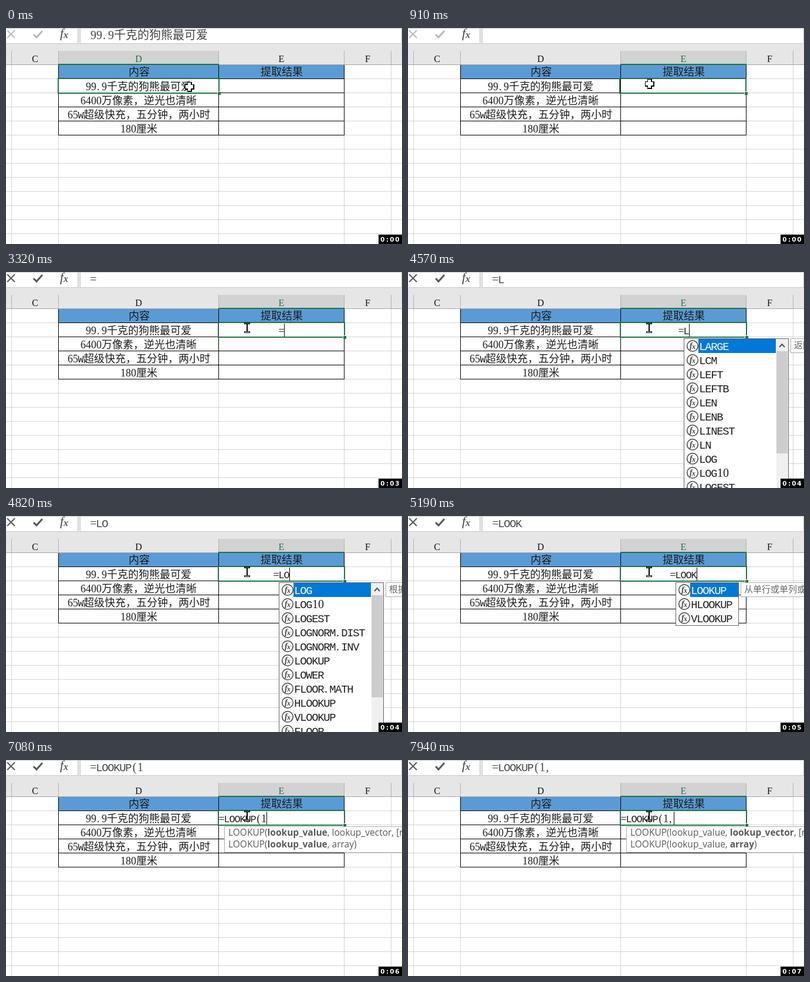
An HTML page with a canvas for the animation above (8 s loop, 675 by 368 pixels).

```html
<!DOCTYPE html>
<html lang="zh-CN">
<head>
<meta charset="utf-8">
<title>LOOKUP</title>
<style>
html, body { margin: 0; width: 100%; height: 100%; overflow: hidden; background: #fff; }
canvas { display: block; width: 675px; height: 368px; }
</style>
</head>
<body>
<canvas id="stage" width="675" height="368" lang="zh-CN"></canvas>
<script>
const ctx = document.getElementById('stage').getContext('2d');
const W = 675, H = 368, LOOP = 8000;
const GREEN = '#217346', GRID = '#d4d4d4', BAR = '#e6e6e6', INK = '#1c1c1c';
const CJK = '"Noto Sans CJK SC", "Noto Sans CJK JP", sans-serif';
const MONO = '"Liberation Mono", monospace';
const SERIF = '"Liberation Serif", serif';
const SANS = '"Open Sans", "Noto Sans", ' + CJK;

const COLS = [9, 89, 362, 576, 656];
const ROWS = ['99.9千克的狗熊最可爱', '6400万像素\uff0c逆光也清晰',
  '65W超级快充\uff0c五分钟\uff0c两小时', '180厘米'];

// Timelines: [start, value]
const TYPED = [[0, ''], [2000, '='], [3570, '=L'], [4820, '=LO'], [4940, '=LOO'], [5190, '=LOOK'],
  [5580, '=LOOKUP('], [7080, '=LOOKUP(1'], [7820, '=LOOKUP(1,']];
const CARET = [[0, 0], [2000, 1], [2590, .5], [2730, 0], [3100, .5], [3210, 1], [3940, .5], [4060, 0],
  [4450, .5], [4570, 1], [5960, .5], [6080, 0], [6570, .5], [6690, 1], [7450, .5], [7570, 0], [7820, 1]];
const CLOCK = [[0, 0], [1130, 1], [2110, 2], [3210, 3], [4190, 4], [5060, 5], [6180, 6], [7200, 7]];
const POINTER = [[0, [312, 100]], [550, [352, 98]], [660, [396, 96]], [780, [411, 95]]];
const SLIDE = [[0, 0], [780, .55], [910, .996], [1010, 1]];

const LISTS = {
  '=L': { names: 'LARGE LCM LEFT LEFTB LEN LENB LINEST LN LOG LOG10 LOGEST LOGNORM.DIST', tip: '返回数据集中第 k 个最大值' },
  '=LO': { names: 'LOG LOG10 LOGEST LOGNORM.DIST LOGNORM.INV LOOKUP LOWER FLOOR.MATH HLOOKUP VLOOKUP FLOOR LOGINV', tip: '根据给定底数返回数字的对数' },
  '=LOO': { names: 'LOOKUP FLOOR.MATH FLOOR.PRECISE HLOOKUP VLOOKUP FLOOR', tip: '从单行或单列或数组中查找一个值' },
  '=LOOK': { names: 'LOOKUP HLOOKUP VLOOKUP', tip: '从单行或单列或数组中查找一个值' }
};

function at(line, t) {
  let value = line[0][1];
  for (const [start, v] of line) if (t >= start) value = v;
  return value;
}

function box(x, y, w, h, color) {
  ctx.fillStyle = color;
  ctx.fillRect(x, y, w, h);
}

function panel(x, y, w, h, edge) {
  box(x, y, w, h, edge);
  box(x + 1, y + 1, w - 2, h - 2, '#fff');
}

function path(points, color, width) {
  ctx.beginPath();
  points.forEach(([x, y]) => ctx.lineTo(x, y));
  ctx.strokeStyle = color;
  ctx.lineWidth = width;
  ctx.stroke();
}

function label(str, x, y, font, color, align = 'left') {
  ctx.font = font;
  ctx.fillStyle = color;
  ctx.textAlign = align;
  ctx.fillText(str, x, y);
  return ctx.measureText(str).width;
}

const isWide = ch => ch > '\u2fff';
const cellWidth = (str, size) => [...str].reduce((w, ch) => w + (isWide(ch) ? size : size / 2), 0);

function glyphFont(ch, size) {
  if (isWide(ch)) return `300 ${size}px ${CJK}`;
  return /[A-Z]/.test(ch) ? `${size * .94}px ${MONO}` : `${size}px ${SERIF}`;
}

// Half-width and full-width characters on a fixed grid
function gridText(str, x, y, size, color) {
  for (const ch of str) {
    const w = isWide(ch) ? size : size / 2;
    if (/[.,]/.test(ch)) label(ch, x + 1, y, glyphFont(ch, size), color);
    else label(ch, x + w / 2, y, glyphFont(ch, size), color, 'center');
    x += w;
  }
}

function centered(str, cx, cy) {
  gridText(str, Math.round(cx - cellWidth(str, 18) / 2), cy + 6, 18, INK);
}

function formulaBar(text, editing) {
  box(0, 0, W, 62, BAR);
  box(0, 0, 122, 26, '#fff');
  box(127, 0, W - 128, 26, '#fff');
  box(0, 0, W, 1, '#c6c6c6');
  box(0, 26, 123, 1, '#c6c6c6');
  box(126, 26, W - 126, 1, '#c6c6c6');
  box(122, 0, 1, 27, '#c6c6c6');
  box(126, 0, 1, 27, '#c6c6c6');
  box(674, 0, 1, 27, '#c6c6c6');
  const ink = editing ? '#555' : '#b8b8b8';
  path([[2, 4], [15, 17]], ink, 2);
  path([[15, 4], [2, 17]], ink, 2);
  path([[47, 11], [52, 16], [62, 5]], ink, 3);
  label('f', 92, 16, `italic 22px ${SERIF}`, '#444');
  label('x', 98, 17, `italic bold 16px ${SERIF}`, '#555');
  gridText(text, 144, 19, 20, '#444');
}

function sheet(active) {
  box(0, 62, W, H - 62, '#fff');
  for (let y = 86; y < H; y += 24) box(0, y, W, 1, GRID);
  COLS.forEach(x => box(x, 62, 1, H - 62, GRID));

  box(COLS[active], 39, COLS[active + 1] - COLS[active], 23, '#d2d2d2');
  COLS.forEach(x => box(x, 39, 1, 23, '#b1b1b1'));
  box(0, 62, W, 1, '#a6a6a6');
  box(COLS[active], 61, COLS[active + 1] - COLS[active] + 1, 2, GREEN);
  [...'CDEF'].forEach((ch, i) => {
    const cx = (COLS[i] + COLS[i + 1] + 1) / 2;
    label(ch, cx, 58, `16px ${SERIF}`, i === active ? GREEN : '#111', 'center');
  });

  box(90, 63, 486, 23, '#5b9bd5');
  for (let y = 86; y <= 182; y += 24) box(89, y, 488, 1, '#000');
  [89, 362, 576].forEach(x => box(x, 63, 1, 120, '#000'));
  centered('内容', 226.5, 75);
  centered('提取结果', 470, 75);
  ROWS.forEach((row, i) => centered(row, 226, 100 + 24 * i));
}

function selection(k) {
  const left = Math.round(89 + 273 * k), right = Math.round(363 + 214 * k);
  ctx.strokeStyle = GREEN;
  ctx.lineWidth = 2;
  ctx.strokeRect(left, 86, right - left, 25);
  box(right - 3, 108, 6, 6, '#fff');
  box(right - 2, 109, 5, 5, GREEN);
}

function cellEdit(text, caret) {
  const w = cellWidth(text, 18);
  const x = text.length > 5 ? 363 : Math.round(469.5 - w / 2);
  gridText(text, x, 106, 18, INK);
  ctx.globalAlpha = caret;
  box(Math.round(x + w), 88, 1, 22, '#000');
  ctx.globalAlpha = 1;
  return x;
}

function fxIcon(x, y) {
  ctx.beginPath();
  ctx.arc(x, y, 9.3, 0, Math.PI * 2);
  ctx.fillStyle = '#fff';
  ctx.fill();
  ctx.strokeStyle = '#444';
  ctx.lineWidth = 1.5;
  ctx.stroke();
  label('f', x - 5, y + 4, `italic bold 14px ${SERIF}`, '#444');
  label('x', x - 1, y + 5, `italic bold 12px ${SERIF}`, '#444');
}

function suggestions({ names, tip }, x) {
  const items = names.split(' ');
  const long = items.length > 10;
  const inner = Math.max(...items.map(s => s.length)) * 10 + 12;
  const w = 26 + inner + (long ? 21 : 0);
  panel(x, 113, w, items.length * 24 + 2, '#646464');
  box(x + 25, 114, inner, 24, '#0078d7');
  items.forEach((name, i) => {
    const y = 126 + 24 * i;
    fxIcon(x + 15, y);
    gridText(name, x + 27, y + 7, 20, i ? INK : '#fff');
  });
  if (long) {
    const sx = x + w - 21;
    box(sx, 114, 20, H - 114, '#f0f0f0');
    box(sx, 135, 19, 174, '#cdcdcd');
    path([[sx + 5, 128], [sx + 9.5, 123], [sx + 14, 128]], '#505050', 2);
  }
  panel(x + w + 3, 113, W, 25, '#ababab');
  label(tip, x + w + 9, 130, `300 15px ${CJK}`, '#666');
}

function hintLine(parts, bold, y) {
  let x = 379;
  parts.forEach((part, i) => {
    x += label(part, x, y, `${i === bold ? 'bold ' : ''}15.5px ${SANS}`, '#595959');
  });
}

function hint(arg) {
  panel(372, 113, W, 45, '#ababab');
  const bold = arg * 2 + 1;
  hintLine(['LOOKUP(', 'lookup_value', ', ', 'lookup_vector', ', [result_vector])'], bold, 129);
  hintLine(['LOOKUP(', 'lookup_value', ', ', 'array', ')'], bold, 149);
}

function crossPointer(x, y) {
  box(x - 3, y - 8, 8, 17, '#000');
  box(x - 7, y - 4, 16, 9, '#000');
  box(x - 2, y - 7, 5, 14, '#fff');
  box(x - 6, y - 3, 13, 6, '#fff');
}

function beamPointer(x, y) {
  box(x - 1, y - 7, 2, 15, '#000');
  box(x - 5, y - 9, 10, 3, '#000');
  box(x - 4, y - 8, 8, 1, '#2fa58c');
  box(x - 5, y + 6, 10, 3, '#000');
  box(x - 4, y + 7, 8, 1, '#fff');
}

function clock(seconds) {
  box(635, 352, 40, 16, '#000');
  ['0', ':', '0', seconds].forEach((ch, i) =>
    label(ch, [642, 650, 658, 667][i], 364, 'bold 10.5px "DejaVu Sans", sans-serif', '#fff', 'center'));
}

function draw(t) {
  const text = at(TYPED, t), slide = at(SLIDE, t);
  const editing = text !== '';
  formulaBar(slide ? text : ROWS[0], editing);
  sheet(slide ? 2 : 1);
  selection(slide);
  if (editing) {
    const x = cellEdit(text, at(CARET, t));
    if (LISTS[text]) suggestions(LISTS[text], x + 9);
    else if (text.length > 5) hint(text.includes(',') ? 1 : 0);
  }
  (editing ? beamPointer : crossPointer)(...at(POINTER, t));
  clock(at(CLOCK, t));
}

const began = performance.now();
function tick() {
  draw((performance.now() - began) % LOOP);
  requestAnimationFrame(tick);
}
tick();
</script>
</body>
</html>
```
